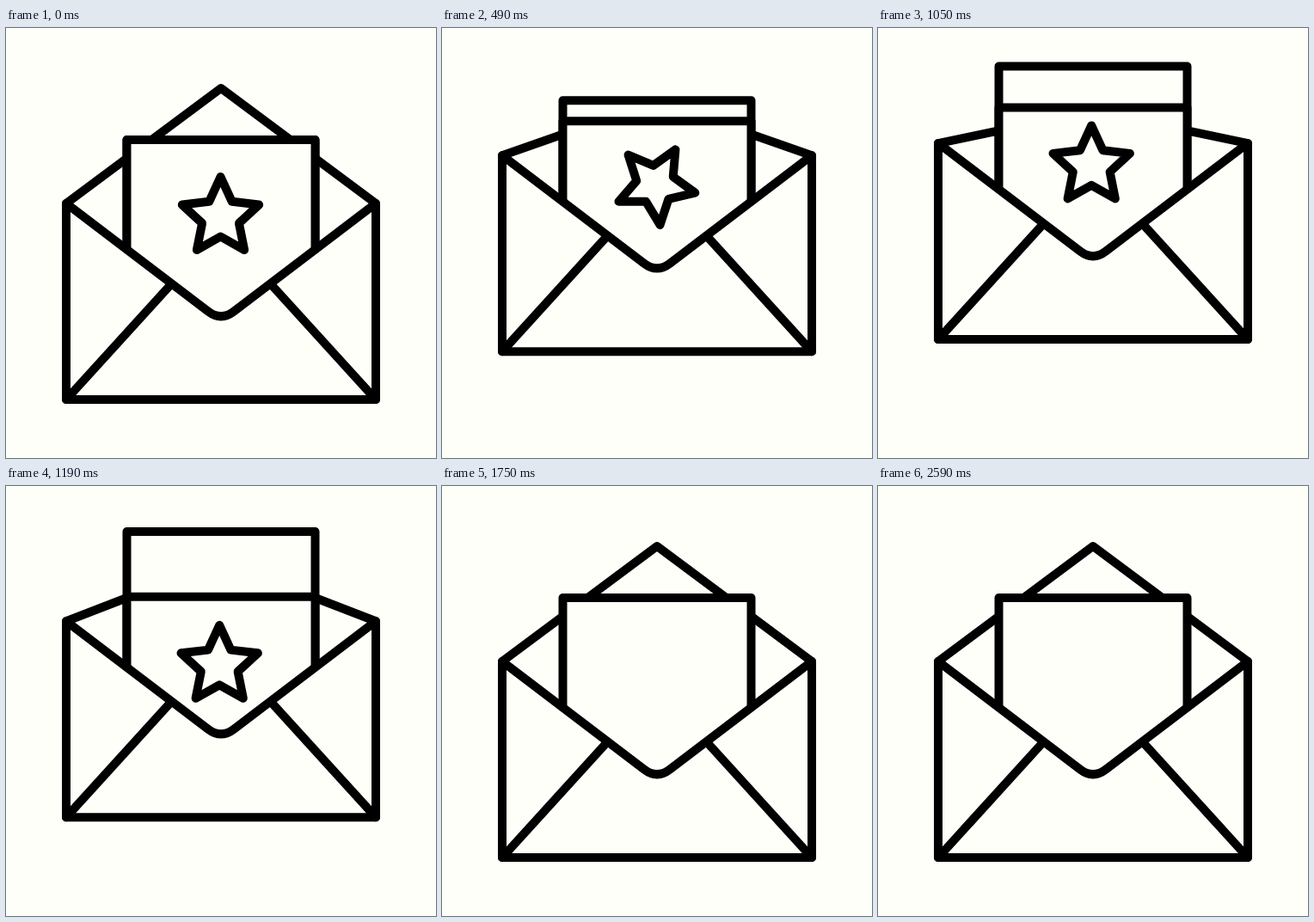
These frames come from a looping animation (500 px wide and 500 px high, 2790 ms). An HTML page:

```html
<!DOCTYPE html>
<html lang="en">
<head>
<meta charset="utf-8">
<title>Letter and envelope</title>
<style>
  html, body { margin: 0; height: 100%; overflow: hidden; background: #fffffa; }
  svg { display: block; width: 100%; height: 100%; }
  path { fill: #fffffa; stroke: #000; stroke-width: 10; stroke-linecap: round; stroke-linejoin: round; }
</style>
</head>
<body>
<svg viewBox="0 0 500 500">
  <path id="flap"/>
  <path id="backCard"/>
  <path id="frontCard"/>
  <path id="star"/>
  <g id="front">
    <path d="M70 204 L235 329.500 Q250 341 265 329.500 L430 204 V432 H70 Z"/>
    <path d="M70 432 L191 299 M430 432 L309 299"/>
  </g>
</svg>
<script>
const LOOP = 2790, STEP = 70, LAST_STEP = 37;
const part = id => document.getElementById(id);
const [flap, backCard, frontCard, star, front] =
  ["flap", "backCard", "frontCard", "star", "front"].map(part);

// Eased progress from 0 to 1 between two times
function ease(t, from, to) {
  const p = Math.min(1, Math.max(0, (t - from) / (to - from)));
  return p * p * p * (p * (6 * p - 15) + 10);
}

const card = (top, bottom) => `M140.500 ${bottom} V${top} H359.500 V${bottom}`;

const starPoints = Array.from({ length: 10 }, (_, i) => {
  const r = i % 2 ? 22.5 : 47, a = i * Math.PI / 5;
  return `${(r * Math.sin(a)).toFixed(2)} ${(-r * Math.cos(a)).toFixed(2)}`;
});
star.setAttribute("d", `M${starPoints.join("L")}Z`);

function draw(t) {
  const fall = ease(t, 838, 1609);
  const lift = -80.5 * (ease(t, 0, 808) - fall);
  const shoulder = 204 + lift;
  const apex = shoulder - 134 + 111 * (ease(t, 0, 850) - fall);
  const backTop = 130 - 85.5 * (ease(t, 0, 945) - ease(t, 1046, 1633));
  const frontTop = 130 - 38 * ease(t, 0, 912) + 252 * ease(t, 1015, 1625);
  const starY = 220 - 60.5 * ease(t, 0, 864) + 232 * ease(t, 1009, 1549);
  const starX = 249.5 - 1.3 * ease(t, 0, 600);
  const spin = 360 * ease(t, 0, 817);

  flap.setAttribute("d", `M70 ${shoulder} L250 ${apex} L430 ${shoulder}`);
  backCard.setAttribute("d", card(backTop, 380 + lift));
  frontCard.setAttribute("d", card(frontTop, 390 + lift));
  star.setAttribute("transform", `translate(${starX} ${starY}) rotate(${spin})`);
  front.setAttribute("transform", `translate(0 ${lift})`);
}

const start = performance.now();
function tick() {
  const t = (performance.now() - start) % LOOP;
  draw(Math.min(Math.floor(t / STEP), LAST_STEP) * STEP);
  requestAnimationFrame(tick);
}
tick();
</script>
</body>
</html>
```
